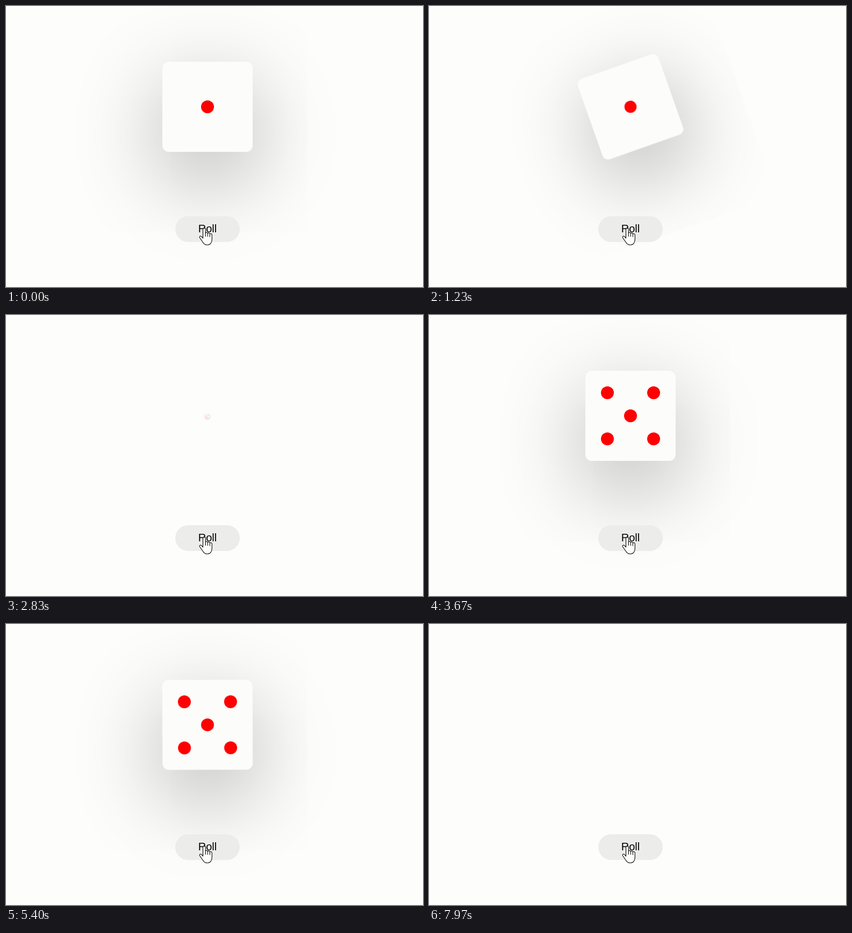
Recreate the animation shown at these times as an HTML page. Size 776 px wide and 524 px high, loop 8000 ms.

```html
<!DOCTYPE html>
<html lang="en">
<head>
<meta charset="utf-8">
<title>Dice roll</title>
<style>
  html, body {
    margin: 0;
    width: 100%;
    height: 100%;
    overflow: hidden;
    background: #fdfdfb;
  }
  .stage {
    position: relative;
    width: 776px;
    height: 524px;
    overflow: hidden;
  }
  .die {
    position: absolute;
    left: 291px;
    top: 104px;
    width: 168px;
    height: 168px;
    border-radius: 12px;
    background: #fcfcfb;
    box-shadow: 0 48px 160px rgba(0, 0, 0, .3);
    animation: roll 8s infinite;
  }
  .pip {
    position: absolute;
    left: 72px;
    top: 72px;
    width: 24px;
    height: 24px;
    border-radius: 50%;
    background: #f00;
    transform: translate(calc(var(--x, 0) * 43px), calc(var(--y, 0) * 43px));
  }
  .rising { animation: rising 8s step-end infinite; }
  .falling { animation: falling 8s step-end infinite; }
  .controls {
    position: absolute;
    inset: 0;
  }
  .controls text {
    font: 20px "Liberation Sans", Arial, sans-serif;
    text-anchor: middle;
  }

  /* Each roll spins the die away to nothing and back again. */
  @keyframes roll {
    0%, 4.6875%, 17.1875%, 30.625%, 43.125%, 55.1875%, 67.6875%, 93.375% {
      transform: rotate(0deg) scale(1);
    }
    10.9375%, 36.875%, 61.4375%, 99.625%, 100% {
      transform: rotate(-360deg) scale(0);
    }
  }

  /* The face changes as a roll ends: 1, 3, 5, 3. */
  @keyframes rising {
    0% { opacity: 0; }
    17.1875%, 100% { opacity: 1; }
  }
  @keyframes falling {
    0%, 67.6875%, 100% { opacity: 0; }
    43.125% { opacity: 1; }
  }
</style>
</head>
<body>
<div class="stage">
  <div class="die">
    <div class="pip"></div>
    <div class="pip rising" style="--x: -1; --y: 1"></div>
    <div class="pip rising" style="--x: 1; --y: -1"></div>
    <div class="pip falling" style="--x: -1; --y: -1"></div>
    <div class="pip falling" style="--x: 1; --y: 1"></div>
  </div>
  <svg class="controls" width="776" height="524" viewBox="0 0 776 524">
    <rect x="315" y="392" width="120" height="48" rx="24" fill="#ececeb"/>
    <text x="375" y="422">Roll</text>
    <g stroke="#000" stroke-width="1.1" stroke-linejoin="round" stroke-linecap="round">
      <path fill="#fefefe" d="M366.5 433V416.5a2.4 2.4 0 0 1 4.8 0V423.5
        c.6-1.8 3.6-1.6 4 .6c1-1.4 3.6-1 4 1c1.4-1.2 4-.4 4 2
        V435c0 6-3 10.5-8 10.5h-1.5c-4 0-6-2.2-7.6-5.2l-5.6-8.1
        c-1.4-2.2 1.2-4.2 3.2-2.4z"/>
      <path fill="none" d="M371.3 423.5v6M375.3 424.2v5.6M379.3 425.5v4.8"/>
    </g>
  </svg>
</div>
</body>
</html>
```
